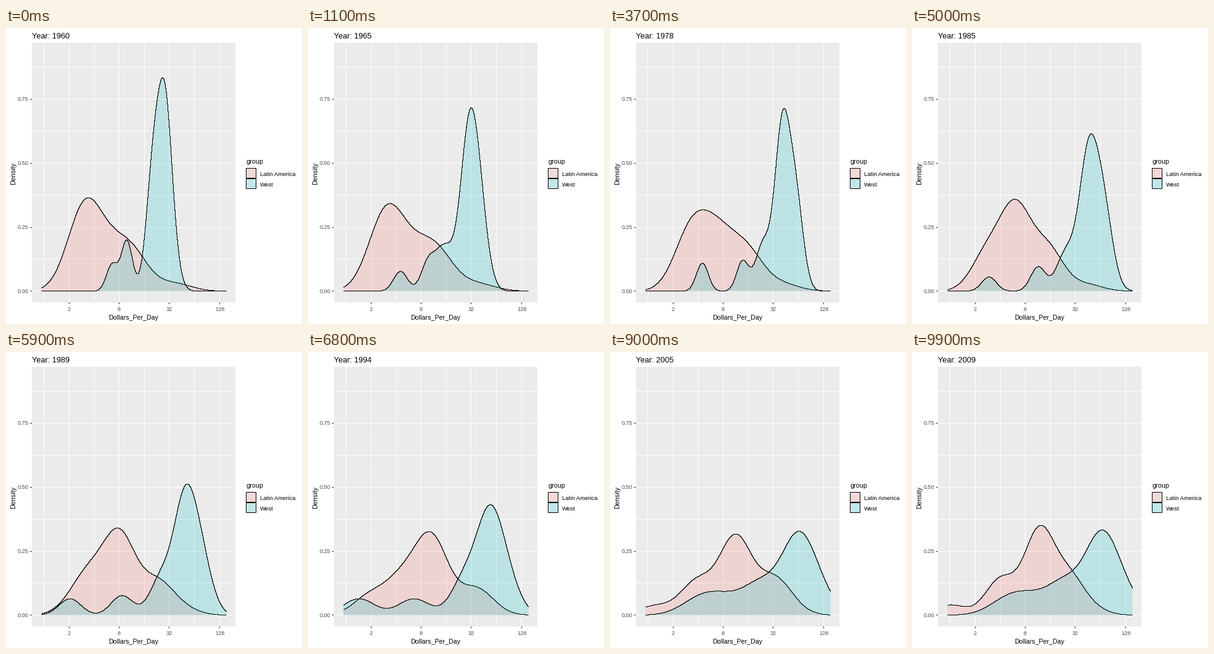
A matplotlib script that plays this animation: 480 px wide and 480 px high, repeating every 10 s.

```python
import numpy as np
import matplotlib.pyplot as plt
from matplotlib.animation import FuncAnimation
from matplotlib.patches import Polygon, Rectangle

plt.rcParams["font.family"] = "Liberation Sans"

SIZE, DPI = 480, 80
PX = 72 / DPI              # points per pixel
FRAMES = 100
X0, STEP = 61.9, 40.6      # x of one dollar, pixels per doubling
BASE, UNIT = 426.8, 415.2  # y of zero density, pixels per density unit
RED, TEAL = "#F8766D", "#00BFC4"

t = np.linspace(0, 1, FRAMES)
KEYS = np.array([0, 11, 25, 50, 68, 80, 99]) / (FRAMES - 1)
xs = np.arange(57.5, 358)
us = (xs - X0) / STEP


def track(*values):
    return np.interp(t, KEYS, values)


def ease(a, b):
    s = np.clip((t - a) / (b - a), 0, 1)
    return s * s * (3 - 2 * s)


def density(clusters, rest, width):
    """Kernel density of (mean, weight, spread) clusters for every frame.

    The cluster at mean `rest` takes the weight the others leave over.
    """
    left = 1 - sum(w for _, w, _ in clusters)
    total = 0
    for mean, w, spread in clusters + [(rest, left, 1)]:
        s = width * spread
        z = (us - mean[:, None]) / s[:, None]
        total = total + (w / s)[:, None] * np.exp(-z * z / 2)
    return total / np.sqrt(2 * np.pi)


early, swap = np.exp(-25 * t), ease(.25, .5)
late, end = ease(.5, .7), ease(.68, .9)

latin = density(
    [(track(1.6, 1.6, 1.95, 1.45, 2.2, 1.85, 2.0), .54 - .33 * swap, 1),
     (track(2.5, 2.7, 2.9, 2.6, 3.4, 3.4, 3.55), .15 + .34 * swap, 1),
     (track(3.45, 3.6, 3.95, 3.9, 5.1, 5.3, 4.75), .25 - .11 * late + .07 * end, 1),
     (5.2 + .5 * t, .05 - .02 * t, 1)],
    rest=3 - 3 * t,
    width=track(.68, .70, .72, .62, .66, .70, .60))

core = track(4.82, 4.87, 5.2, 5.5, 5.7, 5.9, 6.0)
tight = .8 + .4 * late
west = density(
    [(track(2.7, 2.16, 2.72, 1.54, .5, 1.9, 2.4),
      track(.058, .054, .088, .041, .10, .14, .13), tight),
     (track(3.29, 3.25, 4.0, 3.5, 2.7, 3.1, 3.5),
      .07 + .04 * early + .03 * late, tight),
     (track(4.35, 3.9, 4.55, 4.6, 4.7, 4.4, 4.6),
      .135 + .185 * early + .04 * late, 1),
     (core, .469, 1)],
    rest=core + .35 + .5 * t,
    width=track(.28, .35, .235, .37, .52, .68, .65))

fig = plt.figure(figsize=(SIZE / DPI, SIZE / DPI), dpi=DPI, facecolor="white")
ax = fig.add_axes([0, 0, 1, 1])
ax.set_xlim(0, SIZE)
ax.set_ylim(SIZE, 0)
ax.axis("off")


def centre(v):
    """Middle of the pixel that holds v, for crisp lines."""
    return np.floor(v) + .5


def stroke(x, y, color, z=1, **kw):
    return ax.plot(x, y, color=color, lw=PX, zorder=z, snap=False,
                   solid_capstyle="butt", **kw)[0]


def label(x, y, s, size, color="black", **kw):
    return ax.text(x, y, s, fontsize=size * PX, color=color, **kw)


def box(x, y, w, h, z=0, **kw):
    ax.add_patch(Rectangle((x, y), w, h, zorder=z, snap=False, **kw))


# Panel, grid and axes
box(42, 24, 330, 421, fc="#EBEBEB", lw=0)
for j in range(8):
    x, y = centre(X0 + STEP * j), centre(BASE - UNIT * j / 8)
    stroke([x, x], [24, 445], "white")
    stroke([42, 372], [y, y], "white")
    if j % 2:
        stroke([x, x], [445, 448], "#333333")
        label(x, 459, str(2 ** j), 9.1, "#4D4D4D", ha="center")
    else:
        stroke([39, 42], [y, y], "#333333")
        label(36.5, y + 3, f"{j / 8:.2f}", 9.1, "#4D4D4D", ha="right")
label(206.5, 473, "Dollars_Per_Day", 10.6, ha="center")
label(17, 236, "Density", 10.8, rotation=90, ha="right", va="center")
title = label(42, 17, "", 12.7)

# Legend and density curves
label(389, 220, "group", 10.7)
groups = []
for k, (name, color, data) in enumerate((("Latin America", RED, latin),
                                         ("West", TEAL, west))):
    y = 227.5 + 17 * k
    box(389.5, y, 16, 16, fc="#F2F2F2", lw=0)
    box(389.5, y, 16, 16, z=1, fc=color, alpha=.2, lw=0)
    box(389.5, y, 16, 16, z=2, fill=False, ec="black", lw=PX)
    label(412, y + 12.5, name, 9.45)

    area = Polygon([(0, 0)] * 3, fc=color, alpha=.2, lw=0, zorder=3 + 2 * k)
    ax.add_patch(area)
    line = stroke([], [], "black", 4 + 2 * k, drawstyle="steps-post")
    groups.append((BASE - UNIT * data, area, line))


def update(i):
    title.set_text(f"Year: {1960 + round(i * 49 / 99)}")
    for rows, area, line in groups:
        ys = rows[i]
        line.set_data(xs, centre(ys))
        area.set_xy(np.column_stack([np.r_[xs[0], xs, xs[-1]],
                                     np.r_[BASE, ys, BASE]]))
    return [title] + [a for g in groups for a in g[1:]]


anim = FuncAnimation(fig, update, frames=FRAMES, interval=100,
                     repeat=True, repeat_delay=0)
plt.show()
```
